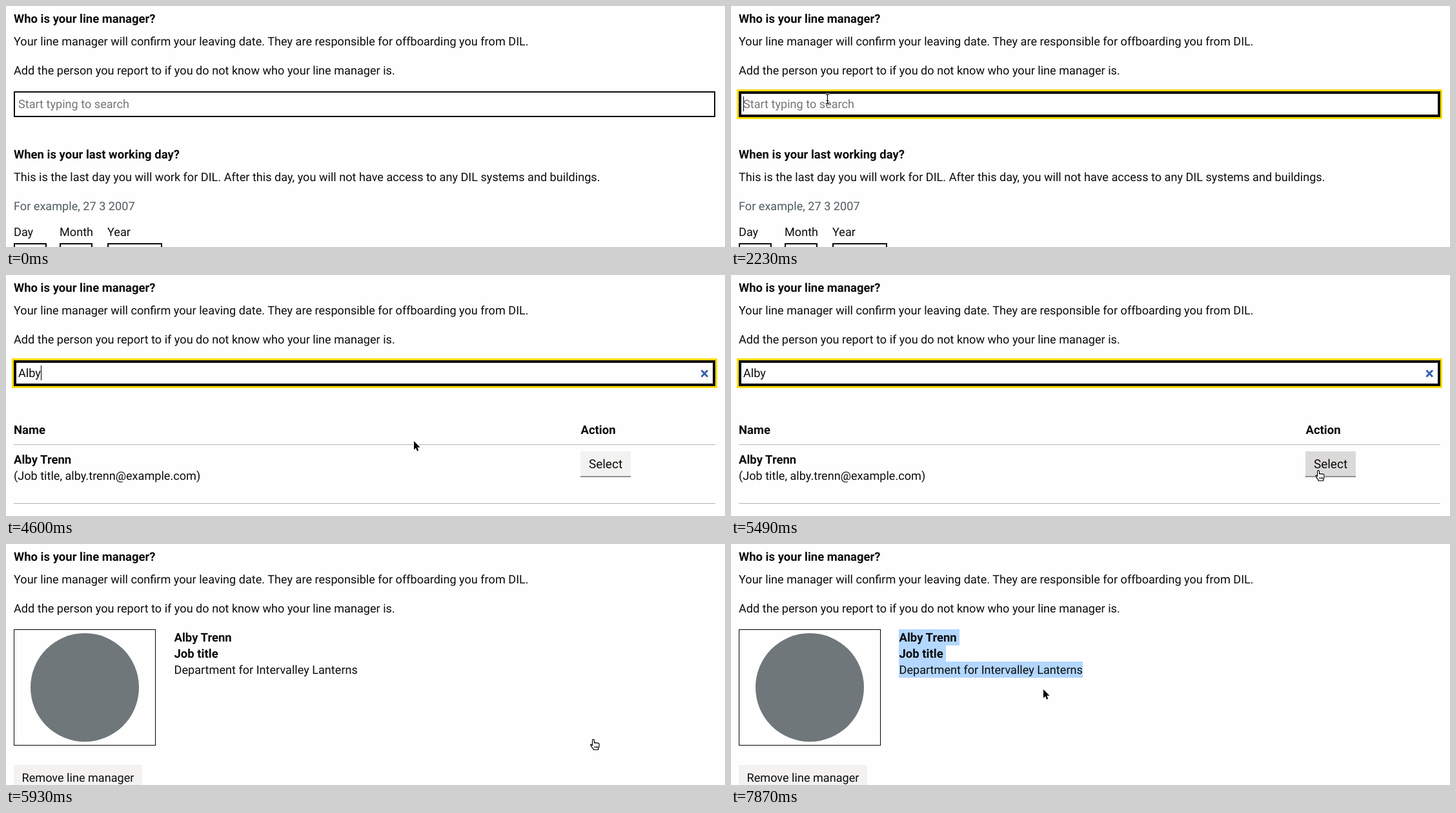
Recreate the animation shown at these times as an HTML page with a canvas. Size 1114x373 px, loop 8 s.

```html
<!DOCTYPE html>
<html lang="en">
<head>
<meta charset="utf-8">
<title>Line manager search</title>
<style>
  html, body { margin: 0; width: 100%; height: 100%; overflow: hidden; background: #fefefe; }
  canvas, svg { position: absolute; left: 0; top: 0; width: 1114px; height: 373px; }
  text { font: 18.13px Roboto, Arial, sans-serif; fill: #0b0c0c; text-rendering: geometricPrecision; }
  .bold { font-weight: 700; font-size: 18.5px; }
  .hint { fill: #505a5f; }
  .placeholder { fill: #757575; }
  .faint { fill: #c9cacb; }
  .mid { text-anchor: middle; font-size: 19px; }
</style>
</head>
<body>
<canvas id="shapes" width="1114" height="373"></canvas>
<svg viewBox="0 0 1114 373">
  <text class="bold" x="12" y="26">Who is your line manager?</text>
  <text x="12" y="61">Your line manager will confirm your leaving date. They are responsible for offboarding you from DIL.</text>
  <text x="12" y="106">Add the person you report to if you do not know who your line manager is.</text>
  <g id="field">
    <text id="placeholder" class="placeholder" x="19" y="158">Start typing to search</text>
    <text id="typed" x="19" y="158"></text>
  </g>
  <g id="form">
    <text class="bold" x="12" y="236">When is your last working day?</text>
    <text x="12" y="271">This is the last day you will work for DIL. After this day, you will not have access to any DIL systems and buildings.</text>
    <text class="hint" x="12" y="316">For example, 27 3 2007</text>
    <text x="12" y="356">Day</text>
    <text x="83" y="356">Month</text>
    <text x="157" y="356">Year</text>
  </g>
  <text id="searching" class="faint" x="12" y="191">Searching...</text>
  <g id="results">
    <text class="bold" x="12" y="246">Name</text>
    <text class="bold" x="890.5" y="246">Action</text>
    <text class="bold" x="12" y="292">Alby Trenn</text>
    <text x="12" y="317">(Job title, alby.trenn@example.com)</text>
    <text id="select" class="mid" x="929" y="299">Select</text>
  </g>
  <g id="card">
    <text class="bold line" x="260.5" y="151">Alby Trenn</text>
    <text class="bold line" x="260.5" y="176">Job title</text>
    <text class="line" x="260.5" y="201">Department for Intervalley Lanterns</text>
    <text x="24.5" y="368">Remove line manager</text>
  </g>
</svg>
<canvas id="pointer" width="1114" height="373"></canvas>
<script>
const LOOP = 8000;
const INK = '#0b0c0c', YELLOW = '#ffdd00', RULE = '#b1b4b6', PALE = '#f3f2f1';
const FOCUS = 1340, RESULTS = 3420, SEARCHED = 3570, HOVER = 5190, PRESS = 5640, RELEASE = 5790, CARD = 5930;
const NAME = 'Alby', KEYS = [2520, 2670, 2820, 3120];

const $ = id => document.getElementById(id);
const g = $('shapes').getContext('2d');
const p = $('pointer').getContext('2d');
const lines = [...document.querySelectorAll('.line')];

const within = (t, a, b) => t >= a && t < b;
const show = (id, on) => { $(id).style.display = on ? '' : 'none'; };
const smooth = x => x * x * (3 - 2 * x);
const easeOut = x => 1 - (1 - x) ** 2;

function box(color, x, y, w, h) {
  g.fillStyle = color;
  g.fillRect(x, y, w, h);
}

function outline(color, x, y, w, h, size) {
  g.strokeStyle = color;
  g.lineWidth = size;
  g.strokeRect(x + size / 2, y + size / 2, w - size, h - size);
}

// Index of the current step when `count` steps run evenly from a to b
const stepAt = (t, a, b, count) =>
  Math.min(count - 1, Math.floor((t - a) / (b - a) * (count - 1) + 0.1));

const mix = (a, b, k) => [a[0] + (b[0] - a[0]) * k, a[1] + (b[1] - a[1]) * k];

function pointerAt(t) {
  const rest = [149, 144];
  if (t < 450) return null;
  if (t < 4010) return ['beam', mix([514, 138], rest, easeOut(stepAt(t, 450, 1040, 5) / 4))];
  if (t < HOVER) {
    const at = mix(rest, [855, 310], smooth((stepAt(t, 4010, 5040, 8) + 1) / 8));
    return [at[1] < 172 ? 'beam' : 'arrow', at];
  }
  if (t < 5490) return ['hand', [905, 309]];
  if (t < 6380) return ['hand', [912, 310]];
  if (t < 7420) {
    const at = mix([912, 304], [262, 157], smooth((stepAt(t, 6380, 7280, 7) + 1) / 7));
    return [at[0] < 356 && at[1] < 207 ? 'beam' : 'arrow', at];
  }
  if (t < 7570) return ['arrow', [244, 131]];
  if (t < 7720) return ['beam', [300, 168]];
  if (t < 7870) return ['beam', [430, 198]];
  return ['arrow', [484, 225]];
}

const ARROW = new Path2D('M0 0V13.4L3 10.6L5 15.4L7.3 14.4L5.3 9.8H9.6Z');
const BEAM = new Path2D('M-3 -7.5Q0 -7.5 0 -5.5Q0 -7.5 3 -7.5M0 -5.5V5.5M-3 7.5Q0 7.5 0 5.5Q0 7.5 3 7.5M-2 2.5H2');
const HAND = new Path2D('M-4 -6.3q0 -1.8 1.5 -1.8q1.5 0 1.5 1.8V-2.5q1.3 -1.3 2.6 0q1.2 -1 2.5 .4' +
  'q2 -.8 2.4 1.3V2q0 2 -1.3 4V8H-2.5V6.5q-2.5 -2 -4.3 -6q.3 -2 2.8 .8Z');
const KNUCKLES = new Path2D('M-.3 2.2V5.6M2 2.2V5.6M4.1 2.2V5.6');

function stroke(path, color, width) {
  p.strokeStyle = color;
  p.lineWidth = width;
  p.stroke(path);
}

function drawPointer([kind, at]) {
  p.save();
  p.translate(Math.round(at[0]), Math.round(at[1]));
  p.lineJoin = 'round';
  if (kind === 'beam') {
    p.translate(0.5, 0);
    stroke(BEAM, 'rgba(255,255,255,.8)', 3);
    stroke(BEAM, '#000', 1.2);
  } else if (kind === 'arrow') {
    stroke(ARROW, '#fff', 2);
    p.fillStyle = '#000';
    p.fill(ARROW);
  } else {
    p.translate(0.5, 0.5);
    stroke(HAND, '#fff', 2.4);
    p.fillStyle = '#fff';
    p.fill(HAND);
    stroke(HAND, '#000', 1.2);
    stroke(KNUCKLES, '#000', 1);
  }
  p.restore();
}

function drawField(t, count) {
  const focused = within(t, FOCUS, PRESS);
  if (focused) outline(YELLOW, 9, 129, 1093, 46, 3);
  outline(INK, 12, 132, 1087, 40, focused ? 4 : 2);

  const caretOn = within(t, FOCUS, 1780) || within(t, 2230, 4010) || within(t, 4510, 5040);
  if (caretOn) {
    const end = count ? $('typed').getComputedTextLength() : 0;
    box('#000', Math.round(19 + end), 140, 1, 23);
  }
  if (count) {
    g.strokeStyle = '#3a62ae';
    g.lineWidth = 3;
    g.beginPath();
    g.moveTo(1077.5, 147.5);
    g.lineTo(1087, 157.5);
    g.moveTo(1087, 147.5);
    g.lineTo(1077.5, 157.5);
    g.stroke();
  }
}

function drawForm() {
  for (const [x, w] of [[12, 51], [83, 51], [157, 85]]) outline(INK, x, 367, w, 40, 2);
}

function drawResults(t) {
  const drop = within(t, PRESS, RELEASE) ? 2 : 0;
  box(RULE, 12, 262, 1087, 1);
  box(RULE, 12, 353, 1087, 1);
  if (!drop) box('#929191', 890, 311, 78, 2);
  box(t >= HOVER ? '#dbdad9' : PALE, 890, 273 + drop, 78, 38);
  $('select').setAttribute('y', 299 + drop);
}

function drawSelection([x, y]) {
  lines.forEach((line, i) => {
    const top = 132 + 25 * i;
    if (y < top) return;
    const end = 260.5 + line.getComputedTextLength();
    const right = y >= top + 25 ? end + (i < 2 ? 4 : 0) : Math.min(x, end);
    box('#b3d7ff', 260, top, Math.round(right) - 260, 25);
  });
}

function drawCard(t, pointer) {
  outline('#000', 12, 132, 220, 180, 1);
  g.fillStyle = '#6f777b';
  g.beginPath();
  g.arc(122, 222, 84, 0, Math.PI * 2);
  g.fill();
  box(PALE, 12, 342, 199, 31);
  if (t >= 7570) drawSelection(pointer[1]);
}

function render(t) {
  const count = KEYS.filter(k => t >= k).length;
  const pointer = pointerAt(t);
  $('typed').textContent = NAME.slice(0, count);
  show('field', t < CARD);
  show('placeholder', !count);
  show('form', t < RESULTS);
  show('searching', within(t, RESULTS, SEARCHED));
  show('results', within(t, RESULTS, CARD));
  show('card', t >= CARD);

  g.clearRect(0, 0, 1114, 373);
  p.clearRect(0, 0, 1114, 373);
  if (t < CARD) drawField(t, count);
  if (t < RESULTS) drawForm();
  else if (t < CARD) drawResults(t);
  else drawCard(t, pointer);
  if (pointer) drawPointer(pointer);
}

function tick() {
  render(performance.now() % LOOP);
  requestAnimationFrame(tick);
}
tick();
</script>
</body>
</html>
```
